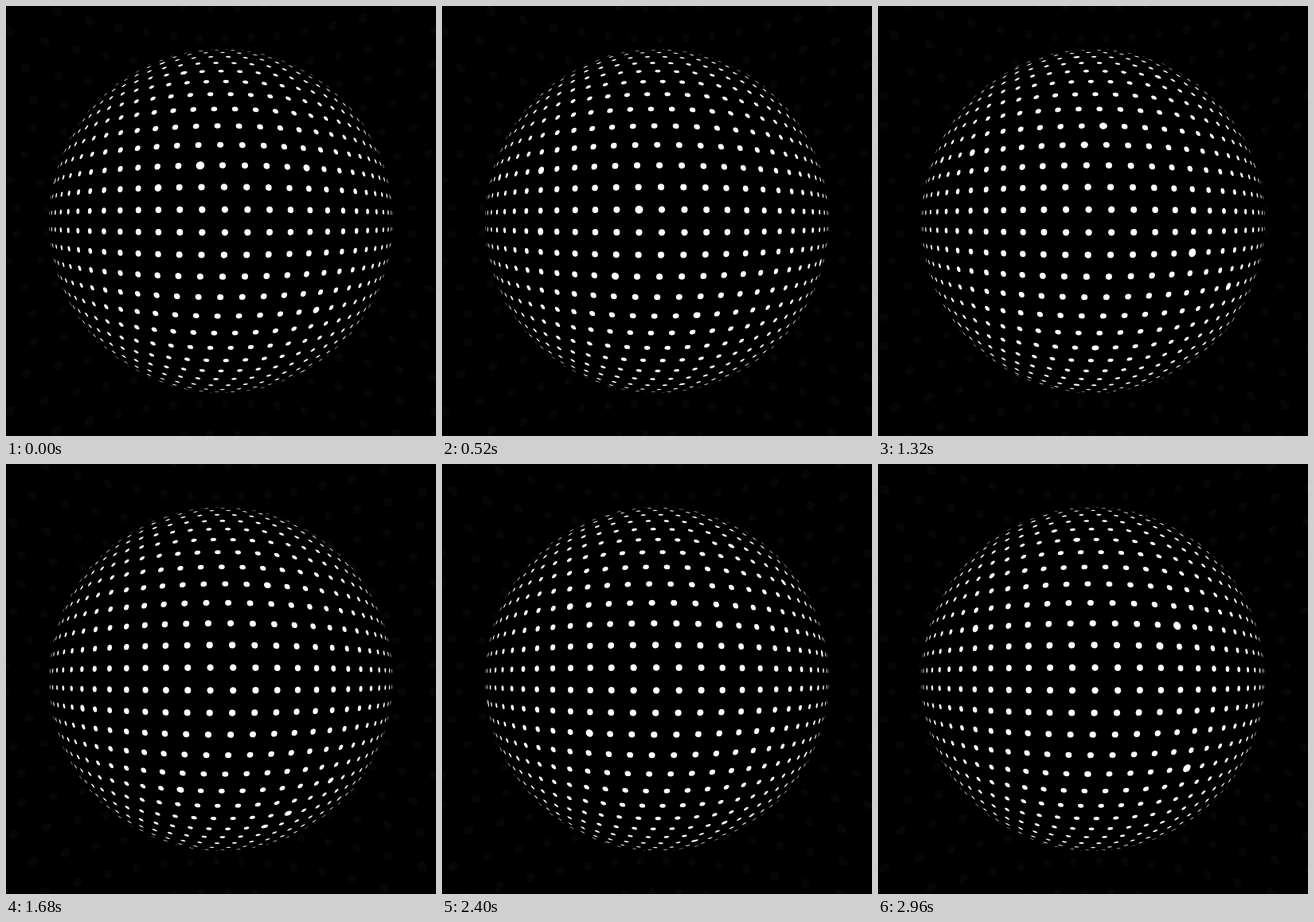
An HTML page with a canvas for the animation above (3 s loop, 540 by 540 pixels).

```html
<!DOCTYPE html>
<html lang="en">
<head>
<meta charset="utf-8">
<title>Dotted sphere</title>
<style>
  html, body { margin: 0; width: 100%; height: 100%; overflow: hidden; background: #000; }
  canvas { display: block; width: 540px; height: 540px; }
</style>
</head>
<body>
<canvas id="stage" width="540" height="540"></canvas>
<script>
const ctx = document.getElementById('stage').getContext('2d');
const { PI, sin, cos, ceil, sqrt, round, floor, abs, max } = Math;
const TAU = 2 * PI, LOOP = 3000, STEP = 40;
const CENTER = 270, EDGE = 216, DIST = 2;
const FOCAL = EDGE * sqrt(DIST * DIST - 1);
const EQUATOR = 82, DOT = 0.0111, SHELL = 40;
const SHIFT = 6;          // dot spacings travelled per loop
const PULSES = 375, LIFE = 80;

// Rows are evenly spaced in latitude, dots evenly spaced along each row.
const rows = [];
for (let k = 0; k < 18; k++) {
  const lat = (k + 0.5) * TAU / EQUATOR;
  const n = EQUATOR * cos(lat);
  const phase = 0.175 - 0.07 * (EQUATOR - n);
  rows.push({ lat, n, phase }, { lat: -lat, n, phase });
}

function place(lat, lon, size) {
  const x = size * cos(lat) * sin(lon);
  const y = -size * sin(lat);
  const z = size * cos(lat) * cos(lon);
  return { x, y, z, w: DIST - z };
}

// A flat disc lying on the sphere, seen in perspective.
function drawDot(p, lat, lon, r) {
  const s = FOCAL * r / p.w;
  const ez = -sin(lon) / p.w;
  const nz = -sin(lat) * cos(lon) / p.w;
  ctx.setTransform(
    s * (cos(lon) + p.x * ez), s * p.y * ez,
    s * (-sin(lat) * sin(lon) + p.x * nz), s * (-cos(lat) + p.y * nz),
    CENTER + FOCAL * p.x / p.w, CENTER + FOCAL * p.y / p.w);
  ctx.beginPath();
  ctx.arc(0, 0, 1, 0, TAU);
  ctx.fill();
}

let seed = 7;
function rand() {
  seed = (seed * 16807) % 2147483647;
  return seed / 2147483647;
}

// Brief swellings of random dots on the near side.
const pulses = Array.from({ length: PULSES }, () => {
  const turn = floor(rand() * LOOP / STEP) * STEP / LOOP;
  const k = floor(rand() * 22);
  const lon = (rand() - 0.5) * TAU / 3;
  const { n, phase } = rows[k];
  const j = round(lon * n / TAU - phase - SHIFT * turn);
  return { turn, k, j, gain: 0.15 + 0.5 * rand() };
});

function swell(turn) {
  const grow = new Map();
  for (const p of pulses) {
    const wraps = round(turn - p.turn);
    const u = abs(turn - p.turn - wraps) * LOOP / LIFE;
    if (u >= 1) continue;
    const key = p.k * 1000 + p.j - SHIFT * wraps;
    const gain = p.gain * (0.5 + 0.5 * cos(PI * u));
    grow.set(key, max(grow.get(key) || 0, gain));
  }
  return grow;
}

function drawShell(turn, size, color, visible, grow) {
  ctx.fillStyle = color;
  rows.forEach(({ lat, n, phase }, k) => {
    const offset = phase + SHIFT * turn;
    const first = ceil(-n / 4 - offset);
    for (let j = first; j < first + n; j++) {
      const lon = (j + offset) * TAU / n;
      const p = place(lat, lon, size);
      if (visible(p)) drawDot(p, lat, lon, DOT * size * (1 + (grow.get(k * 1000 + j) || 0)));
    }
  });
}

function clear(color) {
  ctx.setTransform(1, 0, 0, 1, 0, 0);
  ctx.fillStyle = color;
}

const still = new Map();
function draw(turn) {
  clear('#000');
  ctx.fillRect(0, 0, 540, 540);
  drawShell(turn, SHELL, '#060606', p => p.z < 0, still);
  clear('#000');
  ctx.beginPath();
  ctx.arc(CENTER, CENTER, EDGE, 0, TAU);
  ctx.fill();
  drawShell(turn, 1, '#fff', p => p.z > 1 / DIST, swell(turn));
}

const start = performance.now();
let last = -1;
function tick() {
  const time = floor(((performance.now() - start) % LOOP) / STEP) * STEP;
  if (time !== last) draw((last = time) / LOOP);
  requestAnimationFrame(tick);
}
tick();
</script>
</body>
</html>
```
